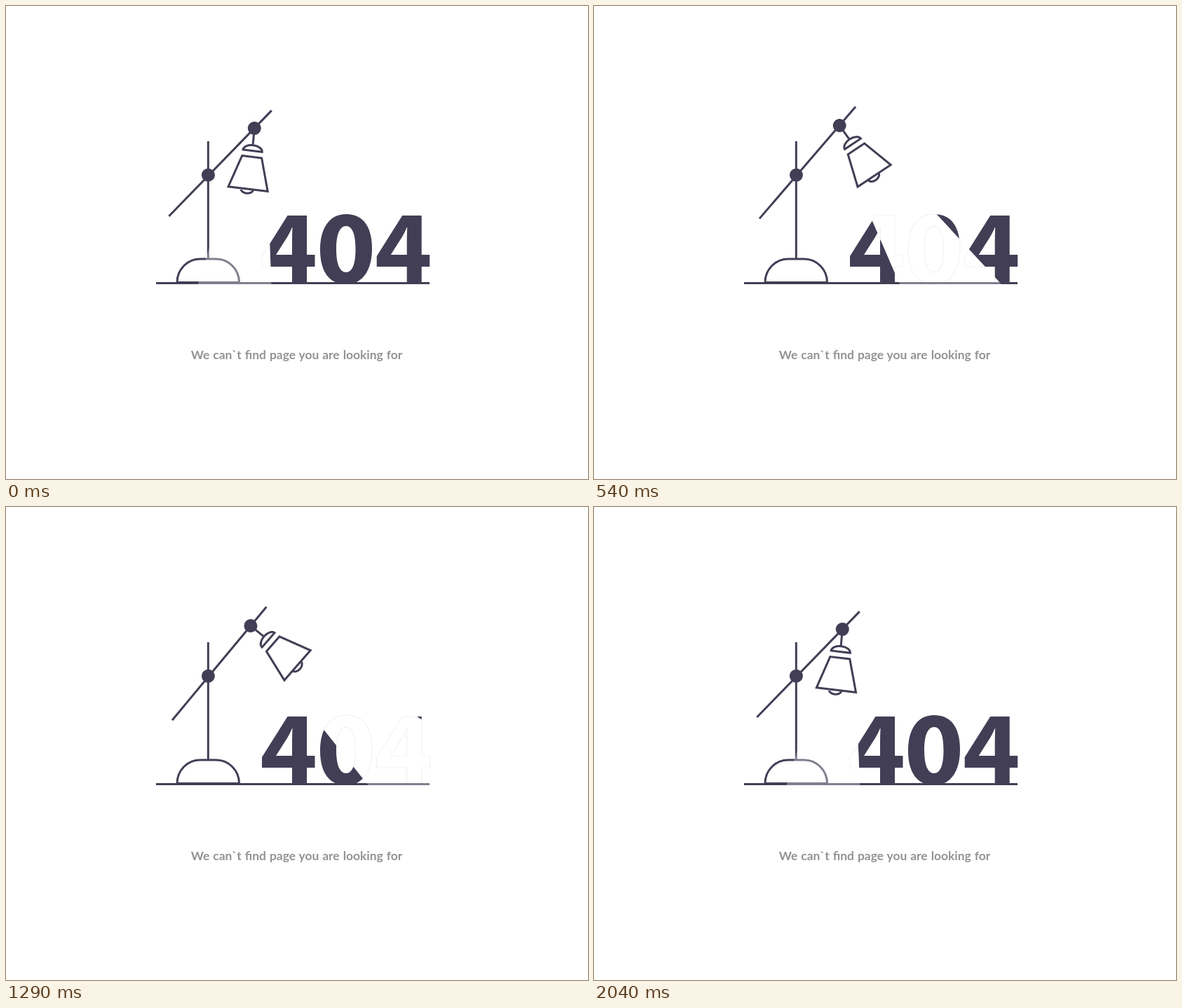
An HTML page that plays this animation: 830 px wide and 675 px high, repeating every 2130 ms.

```html
<!DOCTYPE html>
<html lang="en">
<head>
<meta charset="utf-8">
<title>404</title>
<style>
  html, body { margin: 0; width: 100%; height: 100%; overflow: hidden; background: #fff; }
  svg { display: block; }
  .line { fill: none; stroke: #423e55; stroke-width: 3; }
  .dark { fill: #423e55; }
  .lit { fill: #fff; stroke: #eee; }
  text { font: bold 17.4px Lato, sans-serif; word-spacing: .8px; fill: #939393; text-anchor: middle; }
</style>
</head>
<body>
<svg width="830" height="675" viewBox="0 0 830 675" role="img" aria-label="404">
  <defs>
    <clipPath id="beam">
      <path id="cone" d="M-27 87.5H30L127 687.5H-135Z"/>
    </clipPath>
    <path id="four" fill-rule="evenodd" d="M401.5 299H429V355H440.5V372H429V396.5H408V372H365V357ZM385 355H408V336Q408 326 408.5 316H408Q405 323 401.5 329Z"/>
    <g id="digits">
      <use href="#four"/>
      <path fill-rule="evenodd" d="M485.5 297C509 297 522 315 522 346S509 397 485 397 448 379 448 348 461 297 485.5 297ZM485 314C476 314 471 326 471 347S476 380 485 380 498.5 368 498.5 347 494 314 485 314Z"/>
      <use href="#four" x="163.7"/>
    </g>
  </defs>

  <use href="#digits" class="dark"/>
  <g clip-path="url(#beam)"><use href="#digits" class="lit"/></g>
  <path class="line" d="M214 395.5H604M288.3 193V361M244 394.5A33 33.5 0 0 1 277 361H299.5A33 33.5 0 0 1 332.5 394.5Z"/>
  <rect width="830" height="675" fill="#fff" opacity=".33" clip-path="url(#beam)"/>

  <g id="arm">
    <path class="line" d="M-81.3 1.4L129 -.3"/>
    <circle class="dark" r="9.5"/>
  </g>
  <g id="head">
    <path class="line" d="M0 0L.8 25M-12.4 32.3A13.7 8 0 0 1 15 32.3ZM-12.7 41H15.5L29.8 87.2H-26.8ZM-9 87.2A9 6.3 0 0 0 9 87.2"/>
    <circle class="dark" r="9.5"/>
  </g>
  <text x="414.5" y="503.5">We can`t find page you are looking for</text>
</svg>
<script>
  const LOOP = 2130, FPS = 24;
  const PIVOT = { x: 288.4, y: 241.2 }, REACH = 93.8;
  const [arm, head, cone] = ['arm', 'head', 'cone'].map(id => document.getElementById(id));

  // cubic-bezier(.4, 0, .4, 1)
  function ease(x) {
    let lo = 0, hi = 1, s = .5;
    for (let i = 0; i < 24; i++) {
      s = (lo + hi) / 2;
      if (1.2 * s * (1 - s) + s ** 3 < x) lo = s; else hi = s;
    }
    return s * s * (3 - 2 * s);
  }

  // Goes from 0 to 1 in `half` steps, then back.
  function swing(step, half) {
    return ease(Math.max(0, 1 - Math.abs(step / half - 1)));
  }

  function place(node, x, y, degrees) {
    node.setAttribute('transform', `translate(${x} ${y}) rotate(${-degrees})`);
  }

  function draw(now) {
    const step = Math.floor((now % LOOP + 5) * FPS / 1000);
    const lift = 4.9 * swing(step, 24);
    const tilt = 45.4 + lift, angle = tilt * Math.PI / 180;
    const x = PIVOT.x + REACH * Math.cos(angle);
    const y = PIVOT.y - REACH * Math.sin(angle);
    const turn = lift + 55 * swing(step, 25) - 7;
    place(arm, PIVOT.x, PIVOT.y, tilt);
    for (const node of [head, cone]) place(node, x, y, turn);
  }

  const start = performance.now();
  function tick() {
    draw(performance.now() - start);
    requestAnimationFrame(tick);
  }
  tick();
</script>
</body>
</html>
```
